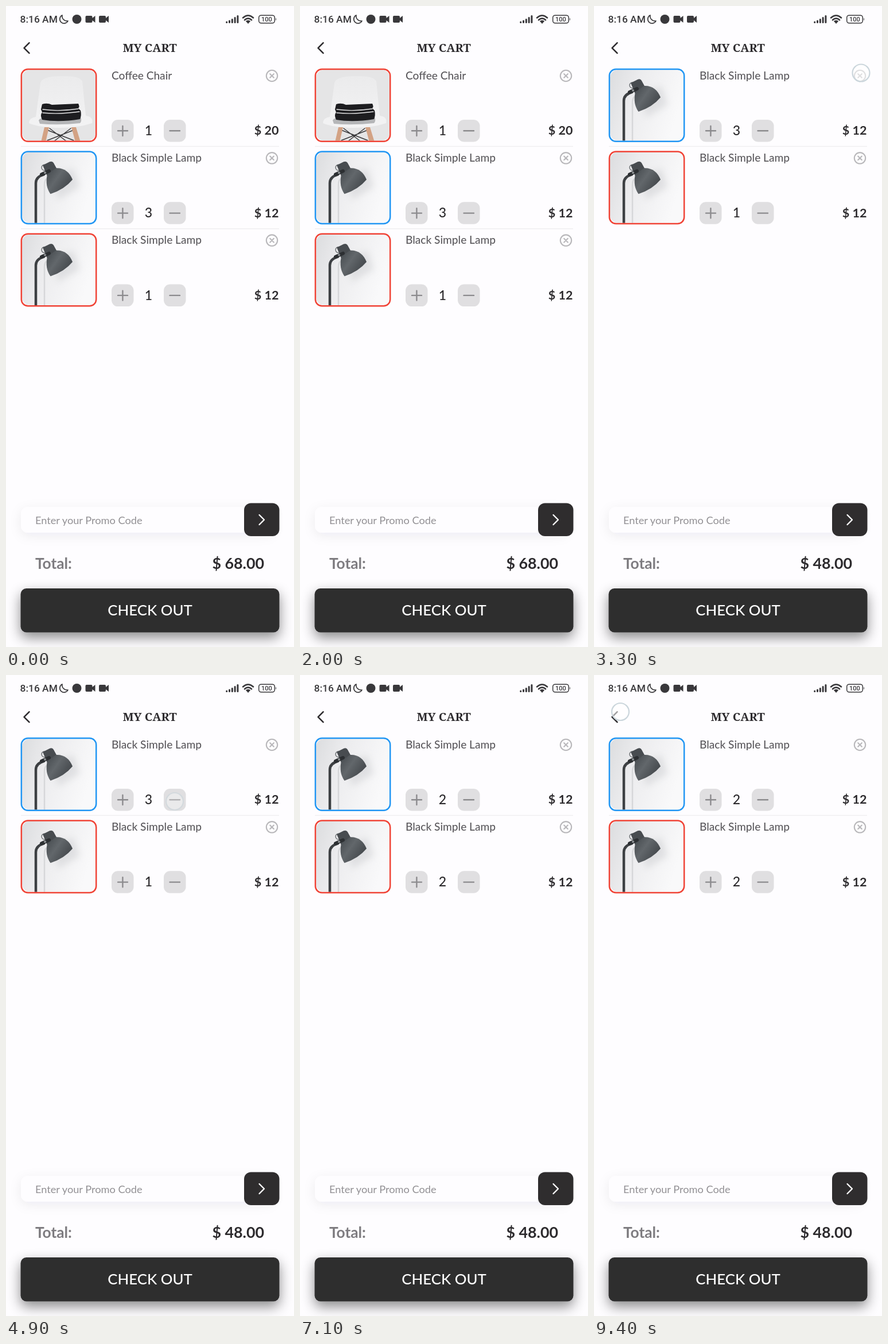
An HTML page for the animation above (9500 ms loop, 502 px wide and 1116 px high).

```html
<!DOCTYPE html>
<html lang="en">
<head>
<meta charset="utf-8">
<title>My Cart</title>
<style>
  html, body { margin: 0; width: 100%; height: 100%; overflow: hidden; background: #fefdff; }
  svg { display: block; width: 100vw; height: 100vh; font-family: Lato, "Open Sans", sans-serif; fill: #2d2b2e; }
  .line { fill: none; stroke-linecap: round; stroke-linejoin: round; }
  .mid { text-anchor: middle; }
  .end { text-anchor: end; }
  .name { font-size: 19.1px; font-weight: 500; fill: #5c5a5e; }
  .price { font-size: 21.5px; font-weight: 700; }
  .count { font-size: 23px; font-weight: 500; }
  .status { font-family: Roboto, sans-serif; font-weight: 500; fill: #39383b; }
</style>
</head>
<body>
<svg viewBox="0 0 502 1116">
  <defs>
    <linearGradient id="wall" x2="1" y2=".3">
      <stop offset="0" stop-color="#dbdcde"/>
      <stop offset=".4" stop-color="#ececee"/>
      <stop offset="1" stop-color="#f9f9fa"/>
    </linearGradient>
    <linearGradient id="metal" x2="1" y2=".7">
      <stop offset="0" stop-color="#43484c"/>
      <stop offset=".45" stop-color="#62676b"/>
      <stop offset="1" stop-color="#3f4347"/>
    </linearGradient>
    <linearGradient id="shell" x2="0" y2="1">
      <stop offset="0" stop-color="#ebebec"/>
      <stop offset="1" stop-color="#f3f3f4"/>
    </linearGradient>
    <clipPath id="frame"><rect x="28" y="111" width="128.500" height="123.500" rx="14"/></clipPath>
    <filter id="blur" x="-50%" y="-50%" width="200%" height="200%"><feGaussianBlur stdDeviation="6"/></filter>
    <filter id="soft" x="-20%" y="-80%" width="140%" height="260%">
      <feDropShadow dx="0" dy="5" stdDeviation="10" flood-color="#202030" flood-opacity=".07"/>
    </filter>
    <filter id="deep" x="-20%" y="-60%" width="140%" height="220%">
      <feDropShadow dx="0" dy="9" stdDeviation="11" flood-color="#000" flood-opacity=".46"/>
    </filter>

    <g id="lamp">
      <rect x="26" y="109" width="132" height="128" fill="url(#wall)"/>
      <path d="M82 150L118 140L128 172L90 194Z" fill="#d2d3d6" opacity=".6" filter="url(#blur)"/>
      <path class="line" d="M67 237V168Q67 160 72 156" stroke="#d6d7d9" stroke-width="2.500"/>
      <path class="line" d="M52 237V165Q52 154 66 150" stroke="#3d4043" stroke-width="4.500"/>
      <circle class="line" cx="67" cy="138" r="5" stroke="#74787b" stroke-width="1.500"/>
      <path d="M64 134L76 128Q81 126 83 130L89 141L72 153Z" fill="#484c50"/>
      <path d="M72 150C69 164 71 175 77.500 184Q102 176 116 159C111 146 101 138 87 139Z" fill="url(#metal)"/>
      <path class="line" d="M62 150L75 144" stroke="#2c2f32" stroke-width="6"/>
      <circle cx="68" cy="147" r="2" fill="#8d9194"/>
    </g>

    <g id="chair">
      <rect x="26" y="109" width="132" height="128" fill="#e5e5e6"/>
      <path d="M60 134Q63 122 96 122Q128 121 133 131L139 191Q153 193 150 204Q125 212 95 212Q60 212 40 204Q40 195 52 193Z" fill="url(#shell)"/>
      <path class="line" d="M76 213L106 236M113 213L83 236M72 216L118 234M118 216L72 234" stroke="#3a3a3c" stroke-width="1.400"/>
      <path d="M67 211H75L69 237H61ZM114 211H122L130 237H121Z" fill="#d3a284"/>
      <path d="M57 199Q60 194 70 195L130 193Q133 200 129 204Q92 208 59 205Z" fill="#b5b6b8"/>
      <path d="M63 171Q72 168 80 172L126 170Q129 175 126 178L130 182Q132 190 129 197Q92 203 63 198Q59 190 63 185L61 180Z" fill="#1d1d20"/>
      <path class="line" d="M64 180Q92 184 126 179M64 186Q92 189 128 184" stroke="#e7e7e8" stroke-width="1.300"/>
    </g>

    <g id="controls">
      <g fill="#e0dfe1">
        <rect x="184" y="198" width="38.500" height="38.500" rx="11"/>
        <rect x="275" y="198" width="38.500" height="38.500" rx="11"/>
      </g>
      <path class="line" d="M195 217.300H212M203.400 209V226M285.500 217.300H303" stroke="#8c8b8e" stroke-width="2.400"/>
      <circle class="line" cx="463.500" cy="121.500" r="9.700" stroke="#b9b8bb" stroke-width="2.100"/>
      <path class="line" d="M460.200 118.200l6.600 6.600m0-6.600l-6.600 6.600" stroke="#b9b8bb" stroke-width="2.100"/>
    </g>
    <path id="camera" d="M2 0H10Q12 0 12 2V4L17 0V12L12 8V10Q12 12 10 12H2Q0 12 0 10V2Q0 0 2 0Z"/>
  </defs>

  <rect width="502" height="1116" fill="#fefdff"/>

  <g class="status">
    <text x="24.500" y="29.300" font-size="17.400">8:16 AM</text>
    <path class="line" d="M98 16A7.500 7.500 0 1 0 108 26A8.500 8.500 0 0 1 98 16Z" stroke="#39383b" stroke-width="1.700"/>
    <circle cx="123.500" cy="23" r="8"/>
    <use href="#camera" x="138.500" y="17"/>
    <use href="#camera" x="162" y="17"/>
    <path class="line" d="M384.700 28v.5M389.500 26v2.500M394.300 23.500v5M399.100 20.500v8M403.900 17.500v11" stroke="#39383b" stroke-width="3"/>
    <path class="line" d="M413 20.500Q422 12.500 431 20.500M416 24.300Q422 19 428 24.300" stroke="#39383b" stroke-width="2.600"/>
    <path d="M417.800 26.300Q422 23 426.200 26.300L422 31Z"/>
    <rect class="line" x="440.700" y="16.200" width="27.600" height="13.600" rx="4" stroke="#39383b" stroke-width="1.500"/>
    <path d="M470 20.500q2 2.500 0 5z"/>
    <text class="mid" x="454.500" y="27" font-size="11">100</text>
  </g>

  <path class="line" d="M40.500 64.200L31.500 73.200L40.500 82.200" stroke="#2d2b2e" stroke-width="2.500"/>
  <text class="mid" x="250.500" y="80" font-size="20.200" font-weight="700" font-family="Noto Serif, serif">MY CART</text>

  <g id="rows"></g>

  <rect x="26" y="872" width="440" height="45" rx="12" fill="#fefdff" filter="url(#soft)"/>
  <text x="51" y="902" font-size="18.200" fill="#929094">Enter your Promo Code</text>
  <rect x="415" y="865.500" width="61.500" height="57.500" rx="12" fill="#2f2d2e"/>
  <path class="line" d="M441.500 886L450 894.500L441.500 903" stroke="#fff" stroke-width="2.300"/>
  <text x="51" y="979.500" font-size="26.300" font-weight="700" fill="#7e7c80">Total:</text>
  <text class="end" id="total" x="450" y="979.500" font-size="26.800" font-weight="700"></text>
  <rect x="25.500" y="1014" width="451" height="76.500" rx="10" fill="#2f2d2e" filter="url(#deep)"/>
  <text class="mid" x="251" y="1060.500" font-size="25.800" font-weight="500" fill="#fff">CHECK OUT</text>

  <circle id="touch" r="15" fill="#fff" fill-opacity=".55" stroke="#cbd6dc" stroke-width="2.200"/>
</svg>
<script>
const LOOP = 9500, PITCH = 143.3;
const REMOVE = 3300, MINUS = 5100, PLUS = 6700;
const RED = '#f04336', BLUE = '#2196f3';
const $ = id => document.getElementById(id);

const items = [
  { name: 'Coffee Chair', art: 'chair', color: RED, price: 20, qty: t => t < REMOVE ? 1 : 0 },
  { name: 'Black Simple Lamp', art: 'lamp', color: BLUE, price: 12, qty: t => t < MINUS ? 3 : 2 },
  { name: 'Black Simple Lamp', art: 'lamp', color: RED, price: 12, qty: t => t < PLUS ? 1 : 2 }
];

// Start, end, position and strength of each tap
const taps = [
  [3050, 3480, 465.5, 116.5, 1],
  [4820, 5200, 294, 220, .6],
  [6480, 6880, 203, 361, .6],
  [9300, 9600, 46, 64, 1]
];

$('rows').innerHTML = items.map(({ name, art, color, price }) => `<g>
  <path class="rule" d="M26 101.200H476" stroke="#efeef1" stroke-width="1.500"/>
  <g clip-path="url(#frame)"><use href="#${art}"/></g>
  <rect class="line" x="26.800" y="110.100" width="130.400" height="125.600" rx="11.500" stroke="${color}" stroke-width="2.500"/>
  <text class="name" x="184" y="127.500">${name}</text>
  <use href="#controls"/>
  <text class="count mid" x="248.500" y="225"></text>
  <text class="price end" x="475.500" y="224.300">$ ${price}</text>
</g>`).join('');
const rows = [...$('rows').children];

function draw(t) {
  let place = 0, total = 0;
  items.forEach((item, i) => {
    const qty = item.qty(t), row = rows[i];
    row.style.display = qty ? '' : 'none';
    if (!qty) return;
    row.setAttribute('transform', `translate(0 ${place * PITCH})`);
    row.querySelector('.rule').style.display = place ? '' : 'none';
    row.querySelector('.count').textContent = qty;
    total += qty * item.price;
    place++;
  });
  $('total').textContent = '$ ' + total.toFixed(2);

  const tap = taps.find(([from, to]) => t >= from && t < to);
  $('touch').style.display = tap ? '' : 'none';
  if (tap) {
    const [from, to, x, y, strength] = tap;
    $('touch').setAttribute('transform', `translate(${x} ${y})`);
    $('touch').style.opacity = strength * Math.min(1, (t - from) / 80, (to - t) / 150);
  }
}

const start = performance.now();
function tick(now) {
  draw(Math.max(0, now - start) % LOOP);
  requestAnimationFrame(tick);
}
draw(0);
requestAnimationFrame(tick);
</script>
</body>
</html>
```
